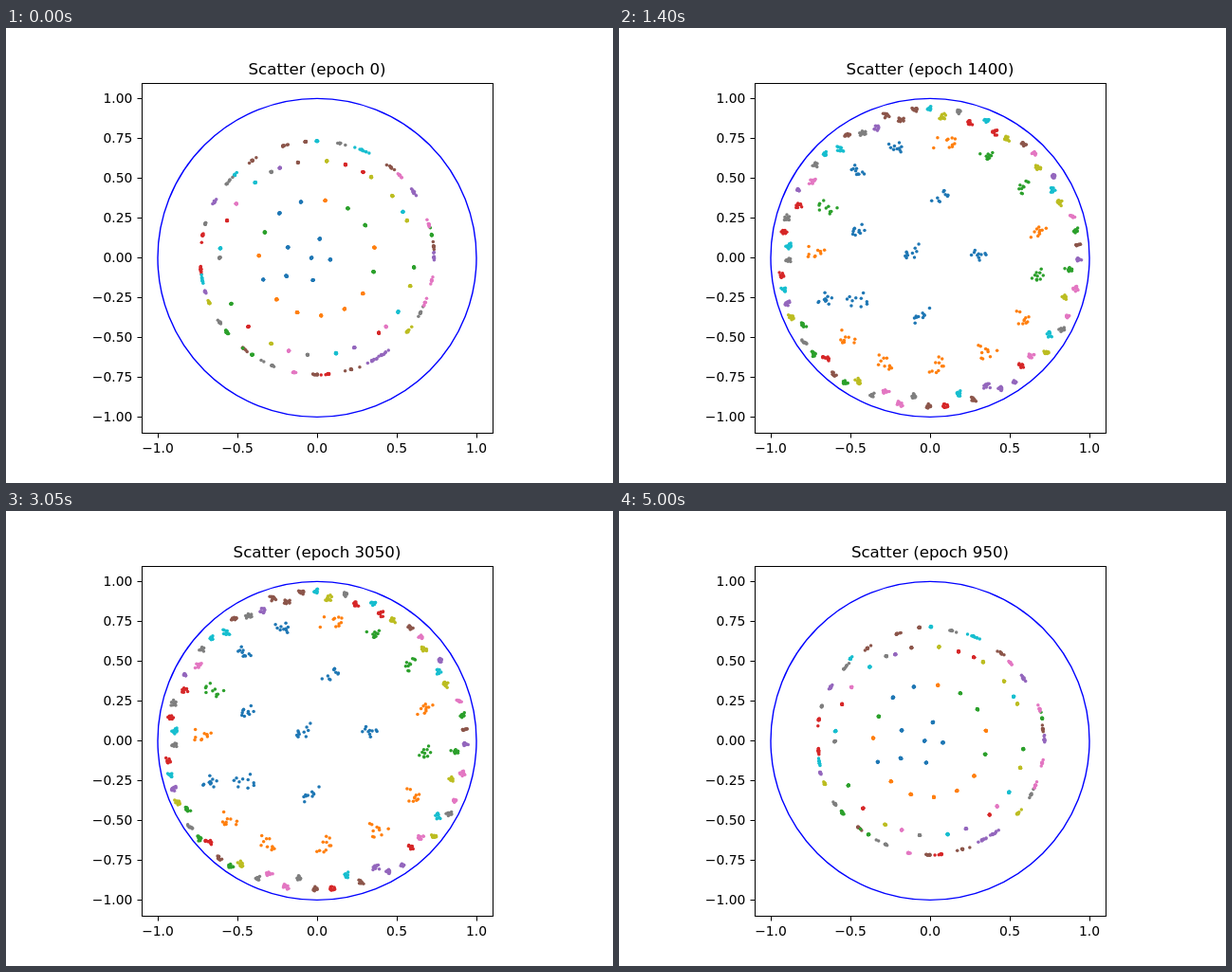
Animation, 640 px wide and 480 px high, one loop 5.05 s. Source, as an HTML page with a canvas:

```html
<!DOCTYPE html>
<html lang="en">
<head>
<meta charset="utf-8">
<title>Scatter</title>
<style>
  html, body { margin: 0; width: 100%; height: 100%; overflow: hidden; background: #fff; }
  canvas, svg { position: absolute; left: 0; top: 0; width: 640px; height: 480px; }
  text { font-family: "DejaVu Sans", sans-serif; font-size: 13.89px; fill: #000; }
  #title { font-size: 16.67px; }
</style>
</head>
<body>
<canvas id="dots" width="640" height="480"></canvas>
<svg id="axes" viewBox="0 0 640 480">
  <circle cx="328" cy="242.4" r="168" fill="none" stroke="#00f" stroke-width="1.4"/>
  <rect x="143.5" y="58.5" width="370" height="369" fill="none" stroke="#000"/>
  <text id="title" x="328" y="49" text-anchor="middle"></text>
</svg>
<script>
const LOOP = 5050, STEP = 50, RESTART = 4050;
const CX = 328, CY = 242.4, R = 168;
const COLORS = {
  b: '#1f77b4', o: '#ff7f0e', g: '#2ca02c', r: '#d62728', p: '#9467bd',
  n: '#8c564b', k: '#e377c2', a: '#7f7f7f', l: '#bcbd22', c: '#17becf'
};
const axes = document.getElementById('axes');
const title = document.getElementById('title');
const ctx = document.getElementById('dots').getContext('2d');

function add(name, attrs, text = '') {
  const el = document.createElementNS(axes.namespaceURI, name);
  for (const key in attrs) el.setAttribute(key, attrs[key]);
  el.textContent = text;
  axes.append(el);
}

const label = (v, digits) => (v < 0 ? '\u2212' : '') + Math.abs(v).toFixed(digits);

for (let v = -1; v <= 1; v += 0.5) {
  const x = CX + v * R;
  add('path', { d: `M${x + 0.5} 427.5v5`, stroke: '#000' });
  add('text', { x, y: 448, 'text-anchor': 'middle' }, label(v, 1));
}
for (let v = -1; v <= 1; v += 0.25) {
  const y = CY - v * R;
  add('path', { d: `M143.5 ${y + 0.1}h-5`, stroke: '#000' });
  add('text', { x: 133.4, y: Math.round(y + 5), 'text-anchor': 'end' }, label(v, 2));
}

let seed = 7;
function random() {
  seed = (seed * 1664525 + 1013904223) % 4294967296;
  return seed / 4294967296;
}
const spread = () => random() + random() - 1;
const clamp = (v, lo, hi) => Math.min(hi, Math.max(lo, v));
const mix = (a, b, p) => a + (b - a) * p;

// Slow flow of the settled clusters: strong inside, faint at the rim.
function drift(u, v, radius) {
  const inner = Math.max(0, 1 - (radius / 160) ** 4);
  const low = Math.max(0, v);
  return {
    x: inner * (11 - 25 * (u * u + v * v) + 120 * u * low * low),
    y: inner * (-11 - 14 * u) + (1 - inner) * 7 * u * u
  };
}

const clusters = [];

function addCluster(key, dx, dy) {
  const radius = Math.hypot(dx, dy);
  // the start lies closer to the centre in hyperbolic distance
  const startRadius = R * Math.tanh(0.46 * Math.atanh(radius / R) ** 1.35);
  const size = clamp(3.2 + (150 - radius) * 0.25, 3.2, 11);
  clusters.push({
    color: COLORS[key], x: CX + dx, y: CY + dy, startRadius,
    angle: Math.atan2(dy, dx),
    flow: drift(dx / R, dy / R, radius),
    lag: random() ** 2,
    swing: random() - 0.5,
    dots: Array.from({ length: 10 }, () => ({
      dx: spread() * size * 1.15,
      dy: spread() * size,
      smear: startRadius > 110 ? 13 * spread() ** 3 : 0,
      jx: spread() * 0.8,
      jy: spread() * 0.8
    }))
  });
}

// Evenly spaced clusters, counterclockwise; capitals sit deeper.
function ring(keys, first, radius, deepRadius) {
  [...keys].forEach((key, i) => {
    const angle = first + 2 * Math.PI * i / keys.length;
    const lower = key.toLowerCase();
    const r = key === lower ? radius : deepRadius;
    addCluster(lower, r * Math.cos(angle), -r * Math.sin(angle));
  });
}

const core = [[8, -59], [-77, -28], [-25, 0], [46, 6], [-12, 66], [-77, 46]];
for (const [dx, dy] of core) addCluster('b', dx, dy);
ring('oggobbgobooooog', 0.175, 118);
ring('pngkLCpLknLRcRaLcnNnPAnCcaKpRarCArcplGagRngLaKkAnrCnPppRKlCakLkG', 0, 157, 148);

function drawDot(x, y) {
  ctx.beginPath();
  ctx.arc(x, y, 1.75, 0, 2 * Math.PI);
  ctx.fill();
}

function drawCluster(c, grow, open, flow) {
  const rest = 1 - grow;
  const angle = c.angle + c.swing * 1.2 * rest;
  const radius = c.startRadius * grow * (1 - 1.1 * rest * c.lag);
  const cx = c.x + c.flow.x * flow, cy = c.y + c.flow.y * flow;
  ctx.fillStyle = c.color;
  for (const d of c.dots) {
    const a = angle + d.smear * grow ** 6 / c.startRadius;
    drawDot(
      mix(CX + radius * Math.cos(a) + d.jx, cx + d.dx, open),
      mix(CY + radius * Math.sin(a) + d.jy, cy + d.dy, open)
    );
  }
}

function draw(time) {
  const t = Math.floor(time % LOOP / STEP) * STEP;
  const growing = t >= RESTART;
  const epoch = growing ? t - RESTART : t;
  const grow = growing ? Math.tanh(epoch / 420) : 1;
  const open = growing ? 0 : 1 - Math.exp(-epoch / 160);
  const flow = growing ? 0 : 1.1 * (1 - Math.exp(-Math.max(0, epoch - 750) / 1000));
  title.textContent = `Scatter (epoch ${epoch})`;
  ctx.clearRect(0, 0, 640, 480);
  for (const c of clusters) drawCluster(c, grow, open, flow);
}

const begin = performance.now();
function tick() {
  draw(performance.now() - begin);
  requestAnimationFrame(tick);
}
tick();
</script>
</body>
</html>
```
